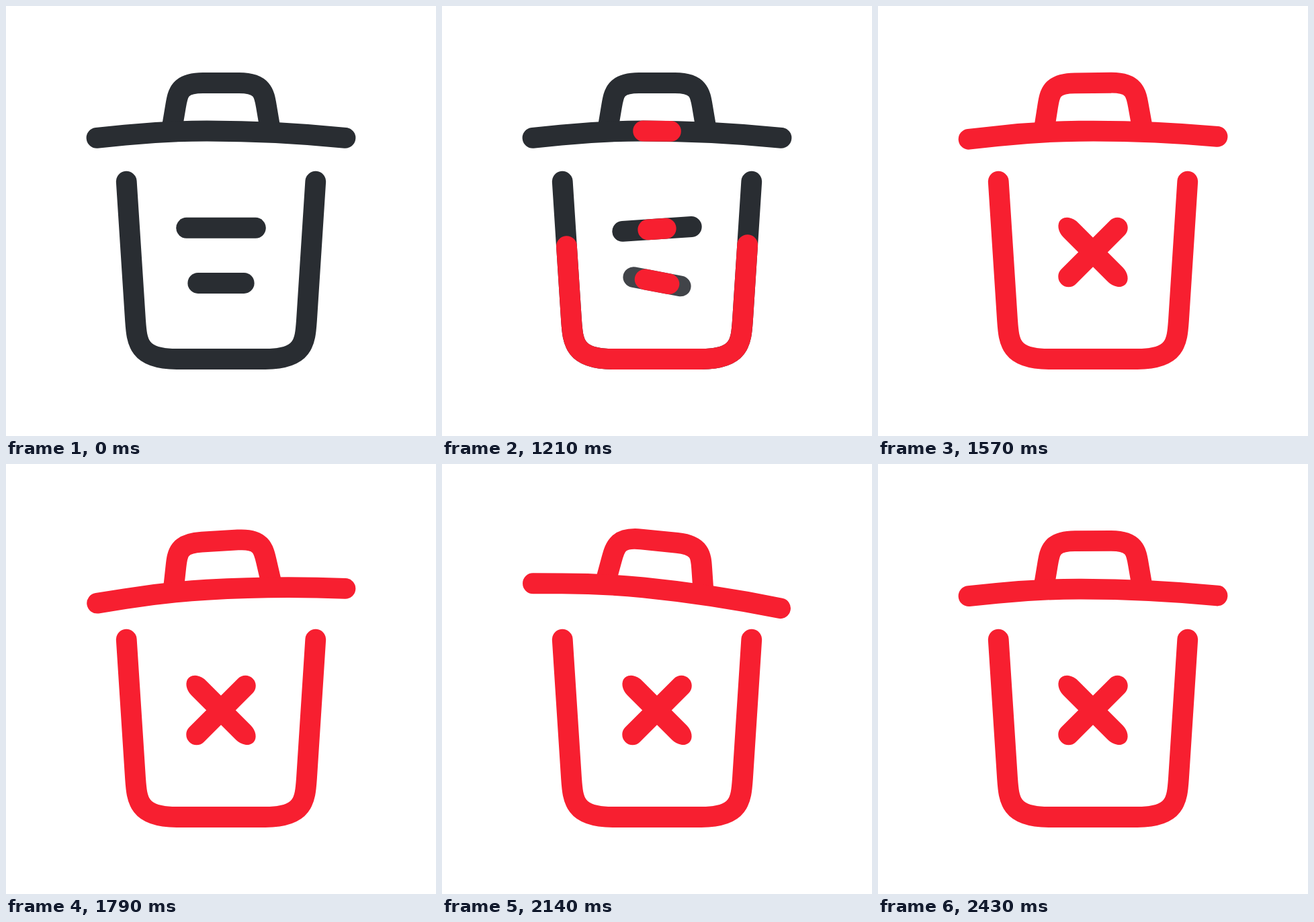
Recreate the animation shown at these times as an HTML page. Size 640 by 640 pixels, loop 2.78 s.

```html
<!DOCTYPE html>
<html lang="en">
<head>
<meta charset="utf-8">
<title>Delete icon</title>
<style>
  html, body { margin: 0; height: 100%; overflow: hidden; background: #fff; }
  svg { display: block; width: 100vw; height: 100vh; }
  path { fill: none; stroke-width: 1.5; stroke-linecap: round; stroke-linejoin: round; }
  .dark { stroke: #292d32; }
  .red { stroke: #f71f30; }
</style>
</head>
<body>
<svg viewBox="0 0 640 640"><g id="icon" transform="translate(320 320) scale(20.55) translate(-12 -12)"></g></svg>
<script>
const LOOP = 2780, STEP = 1000 / 14;
const icon = document.getElementById('icon');

function add(parent, tag, attrs = {}) {
  const el = document.createElementNS('http://www.w3.org/2000/svg', tag);
  for (const key in attrs) el.setAttribute(key, attrs[key]);
  return parent.appendChild(el);
}

// A dark stroke with a red copy that grows over it from the middle.
function part(d) {
  const group = add(icon, 'g');
  return {
    group,
    dark: add(group, 'path', { d, class: 'dark' }),
    red: add(group, 'path', { d, class: 'red', pathLength: 1 })
  };
}

const bin = part('M18.85 9.14l-.65 10.07C18.09 20.78 18 22 15.21 22H8.79C6 22 5.91 20.78 5.8 19.21L5.15 9.14');
const handle = part('M8.5 4.97l.22-1.31C8.88 2.71 9 2 10.69 2h2.62c1.69 0 1.82.75 1.97 1.67l.22 1.3');
const lid = part('M21 5.98c-3.33-.33-6.68-.5-10.02-.5-1.98 0-3.96.1-5.94.3L3 5.98');
const lower = part('M-1.665 0h3.33');
const upper = part('M-2.5 0h5');
const parts = [bin, handle, lid, lower, upper];

function ease(t, start, duration) {
  const u = Math.min(1, Math.max(0, (t - start) / duration));
  return u * u * (3 - 2 * u);
}

const mix = (a, b, p) => a + (b - a) * p;

function fill({ red }, p) {
  red.style.display = p > 0 ? '' : 'none';
  red.style.strokeDasharray = p < 1 ? `${p} 2` : 'none';
  red.style.strokeDashoffset = (p - 1) / 2;
}

const place = ({ group }, transform) => group.setAttribute('transform', transform);

function draw(t) {
  fill(bin, ease(t, 1000, 320));
  fill(handle, ease(t, 1215, 142));
  fill(lid, ease(t, 1165, 239));
  fill(lower, ease(t, 1072, 284));
  fill(upper, ease(t, 1072, 428));

  for (const { dark } of parts) dark.style.opacity = t < 1490 ? 1 : 0;
  lower.dark.style.opacity = 1 - ease(t, 1162, 250);
  upper.dark.style.opacity = 1 - ease(t, 1305, 250);

  // The two bars meet and turn into a cross.
  const move = ease(t, 1181, 254), turn = ease(t, 1157, 317);
  place(upper, `translate(12 ${mix(12.5, 14.26, move)}) rotate(${-45 * turn})`);
  place(lower, `translate(12 ${mix(16.5, 14.26, move)}) rotate(${45 * ease(t, 1100, 359)}) scale(${mix(1, 1.37, turn)} 1)`);

  // The lid rocks left, right and back.
  const angle = -3.5 * ease(t, 1500, 269) + 10.5 * ease(t, 1769, 267) - 7.1 * ease(t, 2036, 397);
  place(lid, `rotate(${angle} 12 5.73)`);
  place(handle, `rotate(${angle} 12 3.485)`);
}

const begin = performance.now();
function tick() {
  const t = (performance.now() - begin) % LOOP;
  // Poses are held at 14 per second, rounded to a 10 ms clock.
  draw(Math.floor((Math.floor(t / 10) * 10 + 5) / STEP) * STEP);
  requestAnimationFrame(tick);
}
tick();
</script>
</body>
</html>
```
